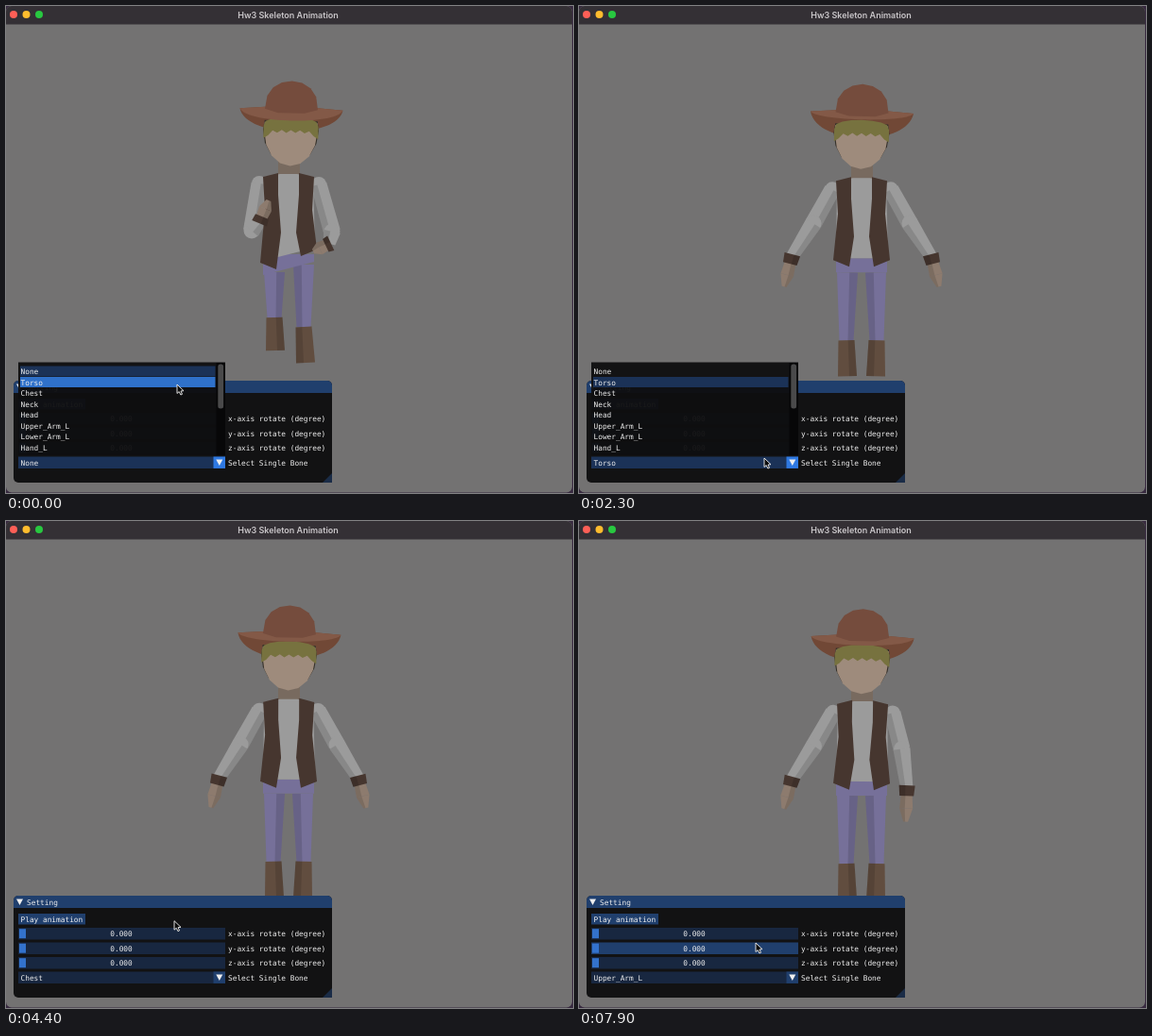
These frames come from a looping animation (600 px wide and 516 px high, 8 s). An HTML page with a canvas:

```html
<!DOCTYPE html>
<html lang="en">
<head>
<meta charset="utf-8">
<title>Skeleton Animation</title>
<style>
html, body { margin: 0; width: 100%; height: 100%; overflow: hidden; background: #37293f; }
canvas { display: block; width: 600px; height: 516px; }
</style>
</head>
<body>
<canvas id="stage" width="600" height="516"></canvas>
<script>
const g = document.getElementById('stage').getContext('2d');
const LOOP = 8000, CX = 299;
const BONES = ['None', 'Torso', 'Chest', 'Neck', 'Head', 'Upper_Arm_L', 'Lower_Arm_L', 'Hand_L'];
const C = {
  shirt: '#9b9b9b', vest: '#46362f', skin: '#9e8b7c', hand: '#8d7b6e', neck: '#786a5f',
  pants: '#767099', boot: '#614d3f', crown: '#754c3d', brim: '#835947', under: '#714836',
  hair: '#77723f', dark: '#36312a', white: '#eeeeee',
  navy: '#182740', blue: '#203f6d', chosen: '#1b3257', hover: '#2f71ca'
};

// Dropdown visits: opened, picked, chosen bone
const PICKS = [[0, 400, 1], [2100, 4250, 2], [5900, 7000, 5]];
// Pointer glides: start, end, destination
const GLIDES = [[1100, 2000, 196, 479], [2600, 3300, 172, 413], [4250, 4900, 198, 459],
  [5300, 5800, 200, 482], [6100, 6500, 187, 447]];

const ramp = (t, a, b) => Math.min(1, Math.max(0, (t - a) / (b - a)));
const lerp = (a, b, k) => a + (b - a) * k;
const mix = (a, b, k) => a.map((v, i) => lerp(v, b[i], k));
const add = (a, b, k = 1) => a.map((v, i) => v + b[i] * k);
const range = (n, f) => Array.from({ length: n + 1 }, (_, i) => f(i / n, i));

function poly(color, points) {
  g.beginPath();
  points.forEach(p => g.lineTo(...p));
  g.closePath();
  g.fillStyle = color;
  g.fill();
}

function rect(color, x, y, w, h, r = 0) {
  g.fillStyle = color;
  g.beginPath();
  g.roundRect(x, y, w, h, r);
  g.fill();
}

function text(s, x, y, align = 'left') {
  g.font = '7.8px "DejaVu Sans Mono", monospace';
  g.textAlign = align;
  g.fillStyle = C.white;
  g.fillText(s, x, y);
}

function at(x, y, degrees, draw) {
  g.save();
  g.translate(x, y);
  g.rotate(degrees * Math.PI / 180);
  draw();
  g.restore();
}

// Tapered bone, darker on the side that faces the body
function bone(color, a, b, wa, wb) {
  const dx = b[0] - a[0], dy = b[1] - a[1], len = Math.hypot(dx, dy);
  const inward = -dy * (CX - a[0]) > 0 ? 0.5 : -0.5;
  const n = [-dy / len * inward, dx / len * inward];
  poly(color, [add(a, n, wa), add(b, n, wb), add(b, n, -wb), add(a, n, -wa)]);
  poly('rgba(0,0,0,.12)', [add(a, n, wa), add(b, n, wb), add(b, n, wb * 0.2), add(a, n, wa * 0.2)]);
}

function joint(color, [x, y], r) {
  rect(color, x - r, y - r, 2 * r, 2 * r, r);
}

const flip = ([x, y]) => [2 * CX - x, y];
const flipLimb = limb => ({ ...Object.fromEntries(Object.entries(limb).map(([k, p]) => [k, flip(p)])) });
const mixLimb = (a, b, k) => Object.fromEntries(Object.keys(a).map(key => [key, mix(a[key], b[key], k)]));

const ARM = { shoulder: [268, 190], elbow: [248, 226], wrist: [225, 262], tip: [217, 293] };
const LEG = { hip: [284, 278], ankle: [283, 350], toe: [284, 388] };
const SWUNG = { shoulder: [331, 190], elbow: [341, 228], wrist: [347, 270], tip: [346, 305] };
const REST = { arms: [ARM, flipLimb(ARM)], legs: [LEG, flipLimb(LEG)], slant: 0 };
const RUN = {
  arms: [
    { shoulder: [268, 188], elbow: [260, 238], wrist: [269, 228], tip: [278, 206] },
    { shoulder: [331, 189], elbow: [345, 239], wrist: [342, 252], tip: [325, 260] }
  ],
  legs: [
    { hip: [284, 282], ankle: [284, 330], toe: [285, 365] },
    { hip: [315, 274], ankle: [315, 340], toe: [317, 378] }
  ],
  slant: 7
};

function sleeve({ shoulder, elbow, wrist }) {
  joint(C.shirt, shoulder, 8);
  bone(C.shirt, shoulder, elbow, 17, 18);
  joint(C.shirt, elbow, 8.5);
  bone(C.shirt, elbow, wrist, 18, 13);
}

function hand({ wrist, tip }) {
  const palm = mix(wrist, tip, 0.6);
  bone(C.hand, wrist, palm, 11, 14);
  bone(C.hand, palm, tip, 14, 5);
  bone(C.vest, mix(wrist, tip, -0.1), mix(wrist, tip, 0.22), 17, 15);
}

function leg({ hip, ankle, toe }) {
  bone(C.pants, hip, ankle, 22, 15);
  bone(C.boot, ankle, toe, 17, 20);
}

function vest(side, drop) {
  const panel = [[27, 181], [25, 216], [30, 265 + drop], [13, 272 + drop], [8, 240], [11, 200], [11, 177]];
  poly(C.vest, panel.map(([x, y]) => [CX + side * x, y]));
}

function body({ arms, legs, slant }, turn) {
  legs.forEach(leg);
  poly(C.pants, [[272, 263], [326, 263], [326, 278 - slant], [272, 278 + slant]]);
  rect(C.neck, 288, 158, 23, 23);
  at(CX, 270, turn, () => {
    g.translate(-CX, -270);
    arms.forEach(sleeve);
    poly(C.shirt, [[273, 181], [290, 178], [308, 178], [325, 181], [327, 263 - slant], [272, 263 + slant]]);
    [-1, 1].forEach(side => vest(side, -side * slant));
    arms.forEach(hand);
  });
}

// Origin: middle of the brim line; nod runs from level to bowed
function head(nod) {
  const arc = (rx, ry, y, power = 1) => range(8, u => {
    const a = Math.PI * u;
    return [-rx * Math.cos(a), y + ry * Math.sin(a) ** power];
  });
  const bowl = (depth, color) => {
    g.beginPath();
    g.moveTo(-54.5, 0);
    g.bezierCurveTo(-48, depth, 48, depth, 54.5, 0);
    g.lineTo(28, -2);
    g.lineTo(-28, -2);
    g.fillStyle = color;
    g.fill();
  };
  bowl(36 - 5 * nod, C.under);
  poly(C.dark, [...arc(29.5, 36, 22), [28, 12], [-28, 12]]);
  poly(C.skin, [...arc(28, 36, 24), [28, 14], [-28, 14]]);
  const fringe = range(12, (u, i) => {
    const x = 2 * u - 1;
    return [29 * x, 22 + (i % 2) * 3 + 9 * x ** 6];
  });
  poly(C.hair, [...fringe, ...arc(-29, -10, 18, 0.7)]);
  bowl(10 + 6 * nod, C.brim);
  poly(C.crown, [...arc(28, -30, 0, 0.8), [14, 4], [-14, 4]]);
}

function figure(t, posed) {
  const drift = 13 * ramp(t, 900, 5100);
  const swing = ramp(t, 7050, 7700);
  const turn = posed ? ramp(t, 4250, 5100) : 0;
  const nod = posed ? turn - 0.75 * swing : 1;
  const pose = posed ? { ...REST, arms: [REST.arms[0], mixLimb(REST.arms[1], SWUNG, swing)] } : RUN;
  g.save();
  g.translate(0, drift);
  body(pose, 0.7 * turn);
  at(299.5 + 2.5 * nod, 108.5 + 1.5 * swing + nod, 1.3, () => head(nod));
  g.restore();
}

function frame() {
  rect('#737272', 0, 0, 599, 515.5, 6);
  rect('#343035', 0, 0, 599, 19.5, [6, 6, 0, 0]);
  ['#fe5f57', '#febc2e', '#28c840'].forEach((c, i) => joint(c, [8 + i * 13.5, 9], 4));
  g.font = '600 9px Inter, sans-serif';
  g.textAlign = 'center';
  g.fillStyle = '#c9c6c9';
  g.fillText('Hw3 Skeleton Animation', 298.5, 12.5);
}

const within = (y, top, h) => y >= top && y < top + h;

function panel(choice, open, y) {
  rect('#121213', 8, 397, 337, 108, 5);
  rect(C.blue, 8, 397, 337, 13, [5, 5, 0, 0]);
  poly('#1a2c47', [[345, 495], [345, 505], [335, 505]]);
  poly(C.white, [[11, 400.5], [18, 400.5], [14.5, 407]]);
  text('Setting', 22, 406.5);
  rect(C.blue, 13, 416, 71, 11.5);
  text('Play animation', 15.5, 424.5);
  ['x', 'y', 'z'].forEach((axis, i) => {
    const top = 431 + i * 15.5;
    const hot = !open && within(y, top, 12.9);
    rect(hot ? C.blue : C.navy, 13, top, 219, 12.4);
    rect('#3372cc', 14, top + 1.2, 7, 10);
    text('0.000', 122, top + 9, 'center');
    text(axis + '-axis rotate (degree)', 235, top + 9);
  });
  const hot = open || within(y, 477.5, 12.4);
  rect(hot ? C.chosen : C.navy, 13, 477.5, 219, 12.4);
  rect(hot ? '#2f79e2' : C.blue, 219.5, 477.5, 12.5, 12.4);
  poly(C.white, [[222.3, 480.6], [229.3, 480.6], [225.8, 487]]);
  text(BONES[choice], 15.5, 486.5);
  text('Select Single Bone', 235, 486.5);
}

function popup(choice, y) {
  rect('rgba(14,14,15,.95)', 13, 377.5, 219, 98.5);
  BONES.forEach((name, i) => {
    const top = 381.6 + i * 11.5;
    const hot = within(y, top, 11.5) && y < 476;
    if (hot || i === choice) rect(hot ? C.hover : C.chosen, 15, top, 206.5, 11);
    text(name, 15.5, top + 8.7);
  });
  rect('#070708', 222.5, 378, 9.5, 98);
  rect('#4a4a4b', 224.3, 379.5, 5.8, 47, 2.5);
}

function pointer([x, y]) {
  at(x, y, 0, () => {
    poly('#0a0a0a', [[0, 0], [0, 9.5], [2.2, 7.6], [3.9, 11], [5.5, 10.3], [4, 7], [7, 6.7]]);
    g.strokeStyle = '#f4f4f4';
    g.lineWidth = 0.9;
    g.stroke();
  });
}

function draw(t) {
  const spot = GLIDES.reduce((p, [a, b, ...to]) => mix(p, to, ramp(t, a, b)), [181, 401]);
  const choice = PICKS.reduce((now, [, picked, index]) => t >= picked ? index : now, 0);
  const open = PICKS.some(([a, b]) => t >= a && t < b);
  g.clearRect(0, 0, 600, 516);
  frame();
  figure(t, choice > 0);
  panel(choice, open, spot[1]);
  if (open) popup(choice, spot[1]);
  pointer(spot);
}

const start = performance.now();
function tick() {
  draw((performance.now() - start) % LOOP);
  requestAnimationFrame(tick);
}
tick();
</script>
</body>
</html>
```
